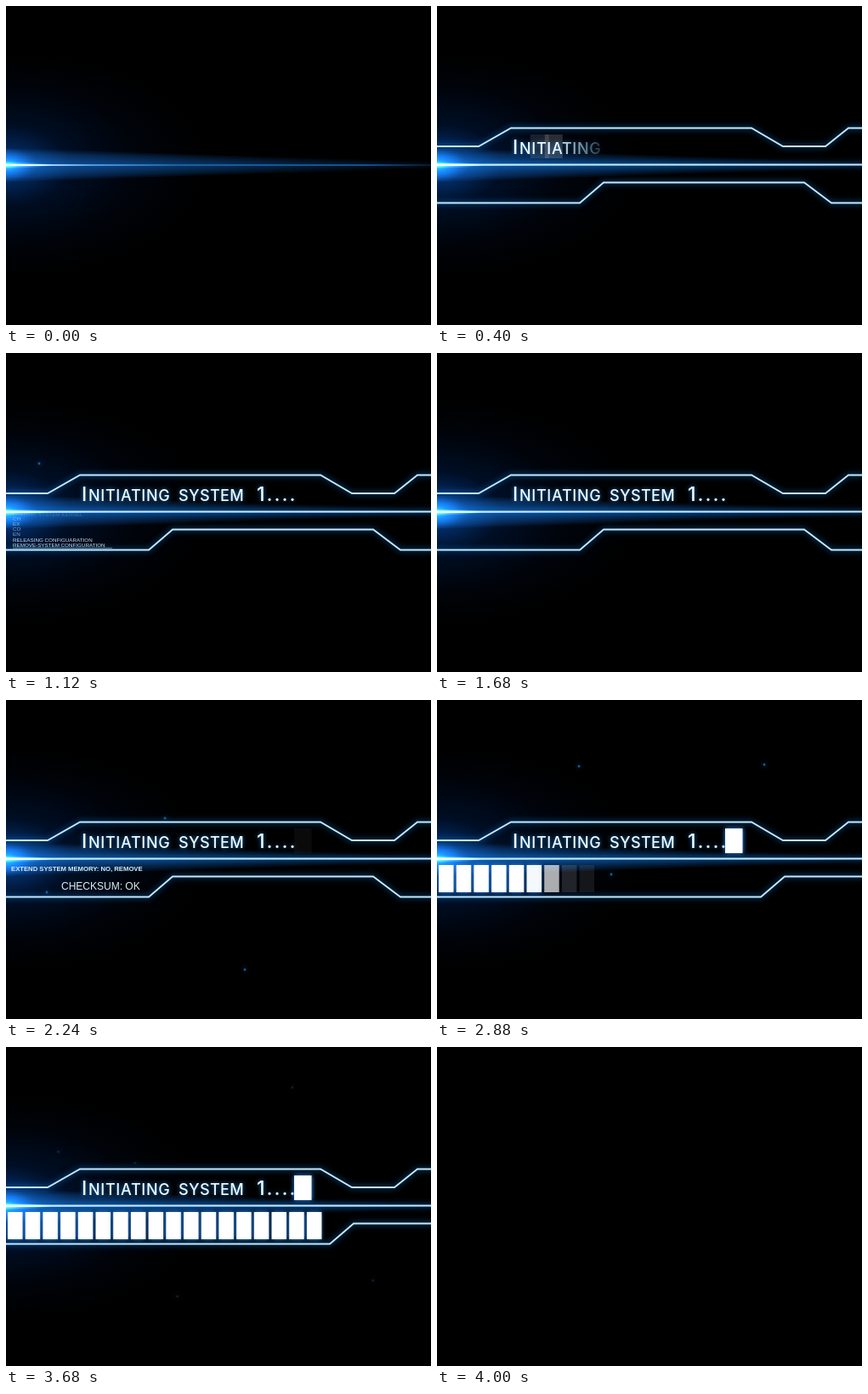
Recreate the animation shown at these times as an HTML page with a canvas. Size 500x375 px, loop 4.08 s.

```html
<!DOCTYPE html>
<html lang="en">
<head>
<meta charset="utf-8">
<title>System start</title>
<style>
  html, body { margin: 0; width: 100%; height: 100%; overflow: hidden; background: #000; }
  canvas { display: block; }
</style>
</head>
<body>
<canvas id="stage" width="500" height="375"></canvas>
<script>
const ctx = document.getElementById('stage').getContext('2d');
const LOOP = 4080, STEP = 80, AXIS = 187;
const SMALL = '"Liberation Sans", Arial, sans-serif';

const clamp = (v, lo = 0, hi = 1) => Math.min(hi, Math.max(lo, v));
const ramp = (t, from, to) => clamp((t - from) / (to - from));
const smooth = p => p * p * (3 - 2 * p);

const TOP = [[0, 165], [49, 165], [87, 143.5], [370, 143.5], [407, 165], [457, 165], [484, 143.5], [510, 143.5]];
const BOTTOM = [[-300, 231.5], [168, 231.5], [196, 207.5], [432, 207.5], [464, 231.5], [510, 231.5]];

const LOG = [
  'LOADING SYSTEM KERNEL', 'CHECKING DEVICE TABLE', 'EXTENDING MEMORY BLOCK',
  'CONNECTING TERMINAL', 'ENABLING DATA CHANNEL',
  'RELEASING CONFIGUARATION', 'REMOVE-SYSTEM CONFIGURATION'
];

// x, y at time `at`, velocity in px per ms
const SPARKS = [
  { x: 39, y: 130, at: 1120, vx: .02, vy: -.03 },
  { x: 187, y: 139, at: 2240, vx: -.02, vy: -.06 },
  { x: 48, y: 226, at: 2240, vx: .01, vy: .05 },
  { x: 281, y: 317, at: 2240, vx: .03, vy: .02 },
  { x: 167, y: 78, at: 2880, vx: -.019, vy: .073 },
  { x: 385, y: 76, at: 2880, vx: -.06, vy: -.046 },
  { x: 205, y: 205, at: 2880, vx: -.004, vy: .11 },
  { x: 356, y: 54, at: 3360, vx: -.06, vy: -.02 },
  { x: 158, y: 113, at: 3360, vx: -.019, vy: .073 },
  { x: 52, y: 136, at: 3360, vx: .03, vy: -.04 },
  { x: 203, y: 258, at: 3360, vx: -.004, vy: .11 },
  { x: 422, y: 265, at: 3360, vx: .03, vy: .03 }
];

// Elliptical light centred on the left end of the beam
function glow(rx, ry, rgb, alpha, fall = .4) {
  ctx.save();
  ctx.globalCompositeOperation = 'lighter';
  ctx.translate(0, AXIS);
  ctx.scale(rx, ry);
  const g = ctx.createRadialGradient(0, 0, 0, 0, 0, 1);
  g.addColorStop(0, `rgba(${rgb},${alpha})`);
  g.addColorStop(.4, `rgba(${rgb},${alpha * fall})`);
  g.addColorStop(1, `rgba(${rgb},0)`);
  ctx.fillStyle = g;
  ctx.fillRect(0, -1, 1, 2);
  ctx.restore();
}

function box(x, y, w, h, alpha) {
  if (alpha <= 0) return;
  ctx.save();
  ctx.globalAlpha = alpha;
  ctx.shadowColor = '#2a90ff';
  ctx.shadowBlur = alpha < .9 ? 0 : 5;
  ctx.fillStyle = '#fff';
  ctx.fillRect(x, y, w, h);
  ctx.restore();
}

function neon(points, dx = 0) {
  ctx.save();
  ctx.beginPath();
  for (const [x, y] of points) ctx.lineTo(x + dx, y);
  ctx.lineWidth = 1.8;
  ctx.strokeStyle = '#c4eaff';
  ctx.shadowColor = '#0a7cd8';
  ctx.shadowBlur = 7;
  ctx.stroke();
  ctx.restore();
}

function label(text, x, y, font, color, spacing = 0) {
  ctx.font = font;
  ctx.letterSpacing = spacing + 'px';
  ctx.fillStyle = color;
  ctx.fillText(text, x, y);
}

// Halo bounded by a wedge that narrows to the right
function wedge() {
  for (let half = 16; half >= 2; half -= 2) {
    const g = ctx.createLinearGradient(0, 0, 500, 0);
    g.addColorStop(0, 'rgba(20,100,190,.17)');
    g.addColorStop(.5, 'rgba(12,75,150,.11)');
    g.addColorStop(1, 'rgba(5,40,90,.04)');
    ctx.fillStyle = g;
    ctx.beginPath();
    ctx.moveTo(0, AXIS - half * 1.2);
    ctx.lineTo(500, AXIS - half * .25);
    ctx.lineTo(500, AXIS + half * .25);
    ctx.lineTo(0, AXIS + half * 1.2);
    ctx.fill();
  }
}

function beam(power) {
  glow(235, 132, '0,16,46', .8, .5);
  glow(150, 95, '0,42,95', .42 + .1 * power);
  wedge();
  glow(75, 48, '15,95,190', .55 + .1 * power, .3);
  glow(38, 20, '50,150,240', .6, .3);
  const g = ctx.createLinearGradient(0, 0, 500, 0);
  g.addColorStop(0, '#f0fbff');
  g.addColorStop(.07, '#c4e8ff');
  g.addColorStop(.2, '#4a9ce0');
  g.addColorStop(.4, '#1c629f');
  g.addColorStop(.85, '#174f85');
  g.addColorStop(1, '#06182c');
  ctx.fillStyle = g;
  ctx.fillRect(0, AXIS - 1, 500, 2);
}

function frameLines(t) {
  ctx.save();
  ctx.beginPath();
  ctx.rect(0, 0, 500 * ramp(t, 0, 320), 375);
  ctx.clip();
  neon(TOP);
  neon([[0, AXIS - .5], [510, AXIS - .5]]);
  neon(BOTTOM, 213 * smooth(ramp(t, 2320, 2640)));
  ctx.restore();
}

function title(t) {
  const front = 90 + (t - 120) * .41;
  if (front <= 90) return;
  const ink = ctx.createLinearGradient(front - 65, 0, front, 0);
  ink.addColorStop(0, '#eefaff');
  ink.addColorStop(1, 'rgba(200,235,255,0)');
  ctx.save();
  ctx.shadowColor = '#1678c8';
  ctx.shadowBlur = 5;
  const caps = '500 18px Inter, "Open Sans", sans-serif';
  const tall = '500 23px Inter, "Open Sans", sans-serif';
  label('I', 89, 174, tall, ink);
  label('NITIATING', 97, 174, caps, ink, .7);
  label('SYSTEM', 203, 174, caps, ink, .4);
  label('1....', 295, 174, tall, ink, 2);
  ctx.restore();
  if (t < 840) {
    box(front - 95, 151, 22, 28, .1);
    box(front - 78, 151, 21, 28, .16);
  }
}

function cursor(t) {
  if (t < 1700) return;
  const wave = Math.cos((t - 340) / 800 * 2 * Math.PI);
  box(339, 151, 20.5, 29, clamp(.55 + 1.2 * wave, .04, 1));
}

function log(t) {
  if (t < 640 || t >= 1680) return;
  const last = Math.floor((t - 640) / STEP);
  const font = '6.25px ' + SMALL;
  for (let age = 0; age < 7 && age <= last; age++) {
    const text = LOG[(last - age) % LOG.length];
    const y = 228 - age * 6.3;
    if (age < 2) label(text, 8, y, font, '#c5e2f0');
    else if (age < 6) label(text.slice(0, 2), 8, y, font, 'rgba(170,215,240,.75)');
    else label(text, 8, y + 2, font, 'rgba(120,175,215,.4)');
  }
  ctx.fillStyle = 'rgba(170,215,240,.7)';
  ctx.fillRect(8, 228.8, 117, .8);
}

function checksum(t) {
  if (t < 1680 || t >= 2320) return;
  const typed = (text, from) => text.slice(0, Math.floor((t - from) / 10));
  label(typed('EXTEND SYSTEM MEMORY: NO, REMOVE', 1680), 6, 201, 'bold 7.7px ' + SMALL, '#d5ebf6');
  if (t > 1920) label(typed('CHECKSUM: OK', 1920), 65, 223, '12px ' + SMALL, '#dcecf4');
}

function progress(t) {
  if (t < 2480) return;
  const head = 7 + (t - 2880) / 53.3;
  const levels = [.08, .13, .67, .95, 1];
  for (let i = 0; i < 18; i++) {
    const lead = Math.round(head - i) + 1;
    if (lead >= 0) box(2 + i * 20.7, 194, 17.5, 32, levels[Math.min(lead, 4)]);
  }
}

function sparks(t) {
  ctx.save();
  ctx.fillStyle = '#1d78b8';
  ctx.shadowColor = '#0a60b0';
  ctx.shadowBlur = 4;
  for (const { x, y, at, vx, vy } of SPARKS) {
    const dt = t - at;
    ctx.globalAlpha = .75 * clamp(1.4 - Math.abs(dt) / 300);
    ctx.beginPath();
    ctx.arc(x + vx * dt, y + vy * dt, 1.4, 0, 7);
    ctx.fill();
  }
  ctx.restore();
}

function draw(now) {
  const t = Math.floor((now % LOOP) / STEP) * STEP;
  ctx.fillStyle = '#000';
  ctx.fillRect(0, 0, 500, 375);
  if (t < 4000) {
    beam(ramp(t, 0, 320));
    sparks(t);
    frameLines(t);
    log(t);
    checksum(t);
    progress(t);
    title(t);
    cursor(t);
    glow(55, 4, '170,225,255', .8);
  }
  requestAnimationFrame(draw);
}
requestAnimationFrame(draw);
</script>
</body>
</html>
```
